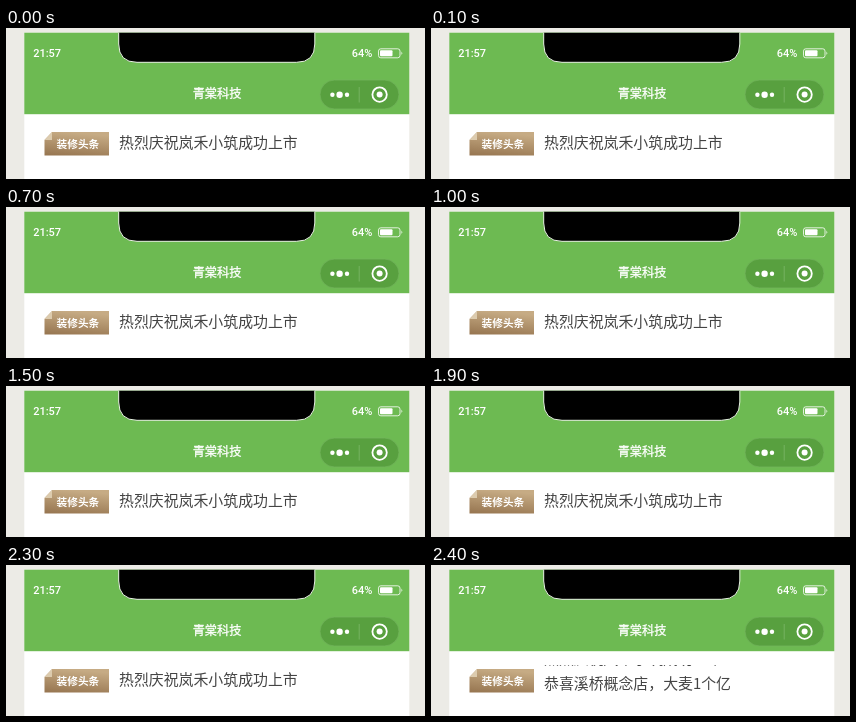
These frames come from a looping animation (419 by 151 pixels, 2500 ms). An HTML page:

```html
<!DOCTYPE html>
<html lang="zh-CN">
<head>
<meta charset="utf-8">
<title>Headline ticker</title>
<style>
  html, body { margin: 0; width: 100%; height: 100%; overflow: hidden; background: #ecebe6; }
  svg { display: block; width: 419px; height: 151px; }
  text { font-family: "Noto Sans CJK SC", "Noto Sans CJK", "Noto Sans", sans-serif; fill: #fff; }
  .status { font: 500 11px Roboto, "Noto Sans", sans-serif; }
  .title { font-size: 12.2px; font-weight: 500; text-anchor: middle; stroke: #fff; stroke-width: .3px; }
  .tag { font-size: 10.7px; font-weight: 700; }
  .news text { font-size: 14.9px; fill: #444; }
  .news { animation: roll 2500ms step-end infinite; }
  /* The ticker jumps most of one line up, just before the loop restarts. */
  @keyframes roll {
    0% { transform: translateY(0); }
    96%, 100% { transform: translateY(-21px); }
  }
</style>
</head>
<body>
<svg viewBox="0 0 419 151">
  <defs>
    <linearGradient id="bronze" x1="0.1" y1="1" x2="0.35" y2="0">
      <stop offset="0" stop-color="#977651"/>
      <stop offset="1" stop-color="#c6ab84"/>
    </linearGradient>
    <clipPath id="window"><rect x="110" y="100" width="285" height="29"/></clipPath>
  </defs>

  <!-- Phone screen -->
  <rect x="18.3" y="4.7" width="385" height="147" fill="#fff"/>
  <rect x="18.3" y="4.7" width="385" height="81.5" fill="#6dba52"/>
  <path d="M112.7 4.7V16Q112.7 34.3 131 34.3H290.5Q308.8 34.3 308.8 16V4.7" stroke="#e9f4e4"/>

  <!-- Status bar -->
  <text class="status" x="27.2" y="28.8">21:57</text>
  <text class="status" x="345.8" y="28.8">64%</text>
  <rect x="372.5" y="20.8" width="21.5" height="9" rx="2.3" fill="none" stroke="#fff" stroke-opacity=".8"/>
  <rect x="374" y="22.3" width="12.5" height="6" rx="1" fill="#fff"/>
  <path d="M395.5 23.6q1.8 1.7 0 3.4z" fill="#fff"/>

  <!-- Title bar -->
  <text class="title" x="211" y="69.8">青棠科技</text>
  <rect x="314" y="52" width="79" height="29" rx="14.5" fill="#58a03f" stroke="#72b45b" stroke-width=".8"/>
  <path d="M353.2 59V74.5" stroke="#7fb96b" stroke-width=".8"/>
  <g fill="#fff">
    <circle cx="326.4" cy="66.7" r="2.2"/>
    <circle cx="333.6" cy="66.7" r="3.2"/>
    <circle cx="341" cy="66.7" r="2.2"/>
    <circle cx="373.6" cy="66.6" r="3"/>
  </g>
  <circle cx="373.6" cy="66.6" r="7.2" fill="none" stroke="#fff" stroke-width="1.8"/>

  <!-- Folded tag -->
  <path d="M46 104H103V127.5H38.5V112Z" fill="url(#bronze)"/>
  <path d="M46 104V112H38.5Z" fill="#dccbae"/>
  <text class="tag" x="50.5" y="120">装修头条</text>

  <!-- Ticker -->
  <g clip-path="url(#window)">
    <g class="news">
      <text x="113" y="119.6">热烈庆祝岚禾小筑成功上市</text>
      <text x="113" y="145.2">恭喜溪桥概念店，大麦1个亿</text>
    </g>
  </g>
</svg>
</body>
</html>
```
